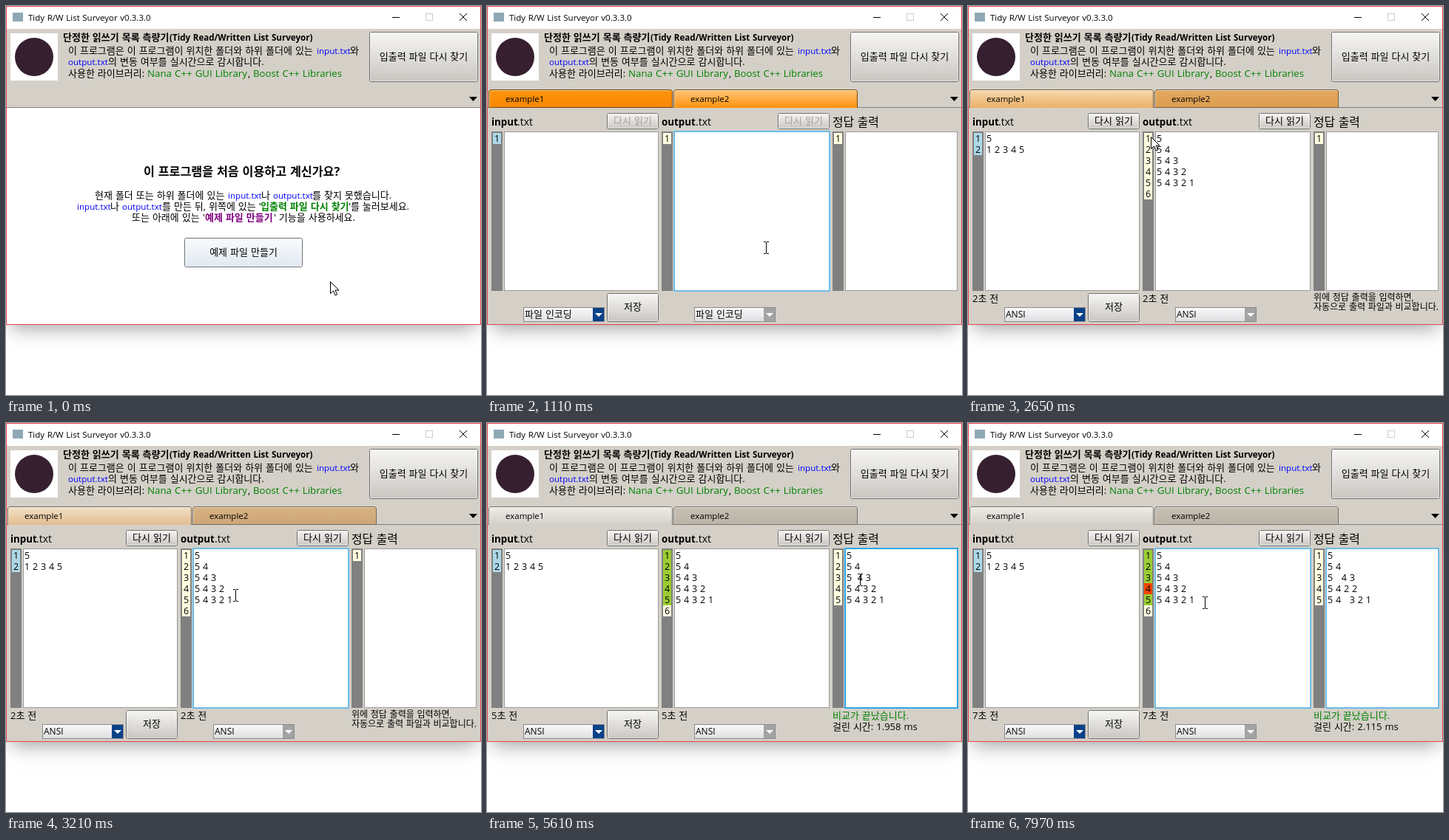
Recreate the animation shown at these times as an HTML page with a canvas. Size 642 px wide and 527 px high, loop 8000 ms.

```html
<!DOCTYPE html>
<html lang="ko">
<head>
<meta charset="utf-8">
<title>List Surveyor</title>
<style>
html, body { margin: 0; width: 100%; height: 100%; overflow: hidden; background: #fff }
canvas { display: block }
</style>
</head>
<body>
<canvas id="stage" width="642" height="527"></canvas>
<script>
const LOOP = 8000;
const ctx = document.getElementById('stage').getContext('2d');
const FACE = '"Open Sans", "Noto Sans CJK KR", "Noto Sans CJK", sans-serif';
const BLUE = '#0000ff', GREEN = '#008000', GRAY = '#d4d0c8';

// Pointer keys: time, x, y
const PATH = [
  [0, 438, 373], [470, 438, 373], [850, 377, 327], [1420, 377, 327],
  [2000, 285, 210], [2180, 285, 210], [2400, 205, 128], [2510, 205, 128],
  [2650, 247, 177], [3000, 300, 232], [3140, 300, 232], [3700, 524, 257],
  [4400, 524, 257], [4700, 400, 250], [4780, 400, 250], [5030, 490, 216],
  [5220, 490, 216], [5370, 504, 212], [6080, 504, 212], [6330, 505, 238],
  [7030, 505, 238], [7240, 505, 225], [7830, 505, 225], [7970, 320, 243]
];
const PANES = { input: [6, 232], output: [236, 463], answer: [467, 636] };

const EXAMPLES = {
  example1: { input: ['5', '1 2 3 4 5'], output: ['5', '5 4', '5 4 3', '5 4 3 2', '5 4 3 2 1', ''] },
  example2: { input: ['(8+2*4)/4'], output: ['8 2 4 * + 4 /', '4', ''] }
};

const within = (t, ...spans) => spans.some(([a, b]) => t >= a && t < b);

function rect(x, y, w, h, fill) {
  ctx.fillStyle = fill;
  ctx.fillRect(x, y, w, h);
}

function frame(x, y, w, h, color) {
  ctx.strokeStyle = color;
  ctx.lineWidth = 1;
  ctx.strokeRect(x + .5, y + .5, w - 1, h - 1);
}

function shape(points, fill, stroke) {
  ctx.beginPath();
  points.forEach(([x, y]) => ctx.lineTo(x, y));
  ctx.closePath();
  ctx.fillStyle = fill;
  ctx.fill();
  if (!stroke) return;
  ctx.strokeStyle = stroke;
  ctx.lineWidth = 1;
  ctx.stroke();
}

function text(str, x, y, { color = '#000', size = 13, bold = false, align = 'left' } = {}) {
  ctx.font = `${bold ? 'bold ' : ''}${size}px ${FACE}`;
  ctx.wordSpacing = '0.6px';
  ctx.textAlign = align;
  ctx.fillStyle = color;
  ctx.fillText(str, x, y);
}

const fileName = (name, x, y) => text(name + '.txt', x, y, { color: BLUE, size: 11.6 });

function vertical(y, h, ...colors) {
  const g = ctx.createLinearGradient(0, y, 0, y + h);
  colors.forEach((c, i) => g.addColorStop(i / (colors.length - 1), c));
  return g;
}

function mix(a, b, k) {
  return `rgb(${a.map((v, i) => Math.round(v + (b[i] - v) * k))})`;
}

function button(label, x, y, w, h, { color = '#000', top = '#f7f6f4', bottom = '#c9c6c1', edge = '#707070' } = {}) {
  ctx.beginPath();
  ctx.roundRect(x + .5, y + .5, w - 1, h - 1, 2);
  ctx.fillStyle = vertical(y, h, top, bottom);
  ctx.fill();
  ctx.strokeStyle = edge;
  ctx.lineWidth = 1;
  ctx.stroke();
  frame(x + 1, y + 1, w - 2, h - 2, 'rgba(255,255,255,.45)');
  text(label, x + w / 2, Math.floor(y + h / 2) + 4, { color, align: 'center' });
}

function windowChrome() {
  rect(0, 0, 642, 527, '#fff');
  ctx.save();
  ctx.shadowColor = 'rgba(0,0,0,.36)';
  ctx.shadowBlur = 24;
  ctx.shadowOffsetY = 5;
  rect(7, 7, 628, 425, '#fff');
  ctx.restore();
  rect(0, 0, 642, 432, '#fff');

  rect(9, 9, 14, 12, '#8fa9b4');
  text('Tidy R/W List Surveyor v0.3.3.0', 30, 20, { size: 11.5 });
  rect(522, 15, 10, 1, '#000');
  frame(567, 10, 10, 10, '#ccc');
  ctx.beginPath();
  ctx.moveTo(613, 10); ctx.lineTo(623, 20);
  ctx.moveTo(623, 10); ctx.lineTo(613, 20);
  ctx.strokeStyle = '#000';
  ctx.stroke();
}

function header() {
  rect(1, 31, 640, 107, GRAY);
  rect(6, 37, 64, 64, '#fff');
  ctx.beginPath();
  ctx.arc(38, 69, 26, 0, 7);
  ctx.fillStyle = '#36202f';
  ctx.fill();

  text('단정한 읽쓰기 목록 측량기', 77, 47, { bold: true });
  text('(Tidy Read/Written List Surveyor)', 221, 47, { bold: true, size: 11.6 });
  text('이 프로그램은 이 프로그램이 위치한 폴더와 하위 폴더에 있는', 84, 65);
  fileName('input', 420, 65);
  text('와', 465, 65);
  fileName('output', 84, 80);
  text('의 변동 여부를 실시간으로 감시합니다.', 138, 80);
  text('사용한 라이브러리:', 84, 96);
  text('Nana C++ GUI Library', 191, 96, { color: GREEN, size: 13.3 });
  text(',', 327, 96);
  text('Boost C++ Libraries', 334, 96, { color: GREEN, size: 13.2 });
  button('입출력 파일 다시 찾기', 491, 35, 147, 68);
}

function welcome(t) {
  rect(1, 138, 640, 293, '#fff');
  text('이 프로그램을 처음 이용하고 계신가요?', 186, 230, { bold: true, size: 16.2 });
  text('현재 폴더 또는 하위 폴더에 있는', 120, 261);
  fileName('input', 300, 261);
  text('나', 345, 261);
  fileName('output', 361, 261);
  text('를 찾지 못했습니다.', 414, 261);
  fileName('input', 96, 276);
  text('나', 141, 276);
  fileName('output', 157, 276);
  text("를 만든 뒤, 위쪽에 있는 '", 211, 276);
  text('입출력 파일 다시 찾기', 344, 276, { color: GREEN, bold: true });
  text("'를 눌러보세요.", 463, 276);
  text("또는 아래에 있는 '", 170, 291);
  text('예제 파일 만들기', 269, 291, { color: '#800080', bold: true });
  text("' 기능을 사용하세요.", 362, 291);
  const hover = t > 700;
  button('예제 파일 만들기', 241, 314, 160, 40, {
    top: '#f9fbfd', bottom: hover ? '#cfe4f5' : '#e1e8f1', edge: hover ? '#4f7f9f' : '#707070'
  });
}

function tabs(t, active) {
  const fade = Math.min(1, Math.max(0, (t - 1460) / 2500));
  ['example1', 'example2'].forEach((name, i) => {
    const x = 2 + i * 250, right = x + 248;
    const on = name === active;
    const top = on ? mix([255, 196, 120], [238, 236, 232], fade) : mix([255, 148, 16], [197, 190, 179], fade);
    const bottom = on ? mix([255, 146, 12], [212, 208, 200], fade) : mix([247, 134, 0], [188, 180, 168], fade);
    shape([[x + .5, 137.5], [x + .5, 115.5], [x + 2.5, 113.5], [right - 1.5, 113.5], [right + .5, 115.5], [right + .5, 137.5]],
      vertical(114, 24, top, bottom), mix([112, 76, 20], [118, 116, 112], fade));
    rect(x + 3, 114, 243, 1, 'rgba(255,255,255,.5)');
    rect(x + 1, 116, 1, 21, 'rgba(255,255,255,.5)');
    text(name, x + 23, 130, { size: 11.5 });
    if (on) rect(x + 1, 137, 247, 1, bottom);
  });
}

function combo(label, x, arrow) {
  rect(x, 408, 110, 20, vertical(408, 20, '#fafafa', '#dedee2'));
  frame(x, 408, 110, 20, '#8a8a8a');
  rect(x + 94, 409, 15, 18, arrow);
  shape([[x + 97, 416], [x + 107, 416], [x + 102, 421]], '#fff');
  text(label, x + 2, 422, { size: label === 'ANSI' ? 12 : 13 });
}

function editor([x, right], lines, cellColor, focus) {
  rect(x, 170, 15, 216, '#808080');
  const left = x + 17, width = right - left;
  rect(left, 170, width, 216, '#fff');
  frame(left, 170, width, 216, '#9c9c9c');
  if (focus) {
    const color = focus === 'strong' ? '#2ea6e6' : '#6fbce9';
    frame(left - 1, 169, width + 2, 218, color);
    frame(left, 170, width, 216, color);
  }
  lines.forEach((line, i) => {
    const y = 172 + i * 15;
    rect(x + 2, y, 11, 15, cellColor(i));
    text(line, left + 2, y + 12, { size: 12.5 });
    text(i + 1, x + 7.5, y + 12, { align: 'center', size: 12.5 });
  });
}

function answerLines(t) {
  if (t < 4470) return [''];
  const gap = (from, to) => ' '.repeat((t >= from) + (t >= to));
  const fourth = t < 7310 ? '5 4 3 2' : t < 7450 ? '5 4  2' : '5 4 2 2';
  return ['5', '5 4', `5 ${gap(5540, 5750)}4 3`, fourth, `5 4 ${gap(6470, 6610)}3 2 1`];
}

function workspace(t) {
  const loaded = t >= 1180;
  const active = t < 2440 ? 'example2' : 'example1';
  const files = loaded ? EXAMPLES[active] : { input: [''], output: [''] };
  const compared = t >= 4540;

  rect(1, 138, 640, 293, GRAY);
  tabs(t, active);

  [['input', 6, 35], ['output', 236, 46]].forEach(([name, x, width]) => {
    text(name, x, 162, { bold: true, size: 13.3 });
    text('.txt', x + width, 162, { size: 14 });
  });
  text('정답 출력', 467, 163, { size: 15.8 });
  const readColor = loaded ? '#000' : '#a0a0a0';
  button('다시 읽기', 162, 145, 70, 22, { color: readColor });
  button('다시 읽기', 393, 145, 70, 22, { color: readColor });

  const outputHover = within(t, [1040, 2300], [2790, 3500], [4580, 4960], [7900, LOOP]);
  const answerStrong = within(t, [3600, 4540], [5300, 5890], [6260, 6740], [7100, 7700]);
  const answerFocus = answerStrong ? 'strong' : compared && 'light';
  const outputCell = i => !compared || i > 4 ? '#ffffe0' : i === 3 && t >= 7380 ? '#ff4500' : '#9acd32';
  editor(PANES.input, files.input, () => '#add8e6');
  editor(PANES.output, files.output, outputCell, outputHover && 'light');
  editor(PANES.answer, answerLines(t), () => '#ffffe0', answerFocus);
  if (within(t, [1800, 2230])) rect(255, 202, 1, 14, '#000');
  if (within(t, [3780, 4300])) rect(487, 173, 1, 14, '#000');

  button('저장', 162, 389, 70, 39);
  const encoding = loaded ? 'ANSI' : '파일 인코딩';
  combo(encoding, 49, '#0a4289');
  combo(encoding, 280, '#a3a3a3');
  if (!loaded) return;

  const age = Math.max(1, Math.floor((t - 230) / 1000)) + '초 전';
  text(age, 6, 401);
  text(age, 236, 401);
  if (compared) {
    const cost = t < 5890 ? '1.958' : t < 6680 ? '2.047' : t < 7520 ? '1.986' : '2.115';
    text('비교가 끝났습니다.', 467, 401, { color: GREEN });
    text(`걸린 시간: ${cost} ms`, 467, 416);
  } else {
    text('위에 정답 출력을 입력하면,', 467, 399, { size: 12 });
    text('자동으로 출력 파일과 비교합니다.', 467, 412, { size: 12 });
  }
}

function pointerAt(t) {
  const next = PATH.findIndex(key => key[0] > t);
  if (next < 0) return PATH[PATH.length - 1].slice(1);
  const [t0, x0, y0] = PATH[next - 1], [t1, x1, y1] = PATH[next];
  const k = (t - t0) / (t1 - t0), ease = k * k * (3 - 2 * k);
  return [x0 + (x1 - x0) * ease, y0 + (y1 - y0) * ease].map(Math.round);
}

function pointer(t) {
  const [x, y] = pointerAt(t);
  const overText = t >= 1040 && y > 170 && y < 386 &&
    Object.values(PANES).some(([left, right]) => x > left + 17 && x < right);
  if (overText) {
    rect(x, y - 7, 1, 15, '#000');
    for (const edge of [y - 8, y + 8]) {
      rect(x - 3, edge, 3, 1, '#000');
      rect(x + 1, edge, 3, 1, '#000');
    }
  } else {
    const outline = [[0, 0], [0, 16], [4, 12.5], [6.5, 18.5], [9, 17.5], [6.5, 11.5], [11.5, 11.5]];
    shape(outline.map(([dx, dy]) => [x + dx + .5, y + dy + .5]), '#fff', '#000');
  }
}

function draw(now) {
  const t = now % LOOP;
  windowChrome();
  header();
  rect(1, 137, 640, 1, '#808080');
  if (t < 1040) welcome(t);
  else workspace(t);
  shape([[626, 123], [637, 123], [631.5, 129]], '#000');
  frame(0, 0, 642, 432, '#e5454c');
  pointer(t);
  requestAnimationFrame(draw);
}
requestAnimationFrame(draw);
</script>
</body>
</html>
```
